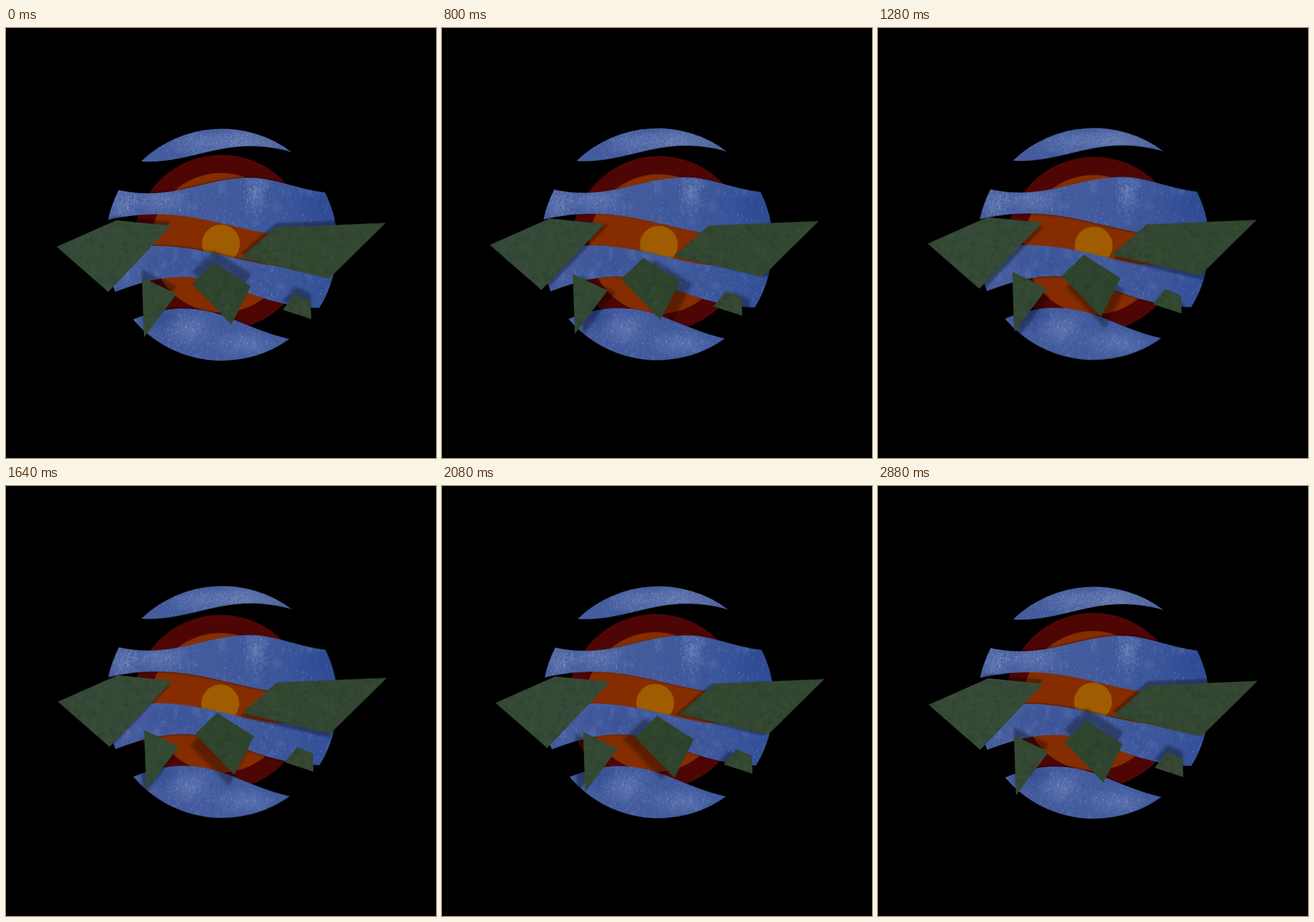
An HTML page with a canvas for the animation above (2920 ms loop, 748x748 px).

```html
<!DOCTYPE html>
<html>
<head>
<meta charset="utf-8">
<style>
html, body { margin: 0; width: 100%; height: 100%; overflow: hidden; background: #000; }
canvas { display: block; }
</style>
</head>
<body>
<canvas id="stage" width="748" height="748"></canvas>
<script>
const SIZE = 748, FRAME = 40, FRAMES = 73;
const ctx = document.getElementById('stage').getContext('2d');

let seed = 7;
const rand = () => (seed = (seed * 16807) % 2147483647) / 2147483647;
const spread = () => rand() + rand() + rand() - 1.5;

// Pre-renders shapes once; the texture only lands on painted pixels.
function layer(shapes, texture) {
  const canvas = document.createElement('canvas');
  canvas.width = canvas.height = SIZE;
  const g = canvas.getContext('2d');
  for (const [path, color] of shapes) {
    g.fillStyle = color;
    g.fill(new Path2D(path));
  }
  g.globalCompositeOperation = 'source-atop';
  if (texture) texture(g);
  return canvas;
}

function blot(g, x, y, rx, ry, rgb, alpha) {
  g.save();
  g.translate(x, y);
  g.scale(rx, ry);
  const fade = g.createRadialGradient(0, 0, 0, 0, 0, 1);
  fade.addColorStop(0, `rgba(${rgb},${alpha})`);
  fade.addColorStop(1, `rgba(${rgb},0)`);
  g.fillStyle = fade;
  g.fillRect(-1, -1, 2, 2);
  g.restore();
}

function paintWater(g) {
  const light = '142,162,212', dark = '38,66,138';
  const shade = g.createLinearGradient(174, 0, 578, 0);
  shade.addColorStop(0, 'rgba(76,96,160,.5)');
  shade.addColorStop(.5, 'rgba(64,88,156,.3)');
  shade.addColorStop(1, 'rgba(42,74,150,.75)');
  g.fillStyle = shade;
  g.fillRect(0, 0, SIZE, SIZE);
  blot(g, 450, 200, 110, 40, '122,134,176', .5);
  blot(g, 550, 310, 60, 70, dark, .4);
  blot(g, 265, 502, 45, 30, dark, .6);
  blot(g, 300, 405, 90, 45, dark, .25);
  const patches = [[322, 525, 50, 32], [435, 288, 24, 40], [205, 305, 32, 32],
    [270, 300, 55, 28], [335, 200, 55, 28], [400, 195, 50, 22], [420, 550, 70, 28]];
  for (const p of patches) blot(g, ...p, light, .32);
  for (let i = 0; i < 150; i++)
    blot(g, 174 + rand() * 404, 175 + rand() * 404, 3 + rand() * 10, 6 + rand() * 16,
      rand() < .45 ? light : dark, .18);
  for (let i = 0; i < 12000; i++) {
    let x = 174 + rand() * 404, y = 175 + rand() * 404;
    if (i % 5 < 2) {
      const p = patches[i % patches.length];
      x = p[0] + spread() * p[2];
      y = p[1] + spread() * p[3];
    }
    g.fillStyle = rand() < .55 ? `rgba(160,180,225,${rand() * .4})` : `rgba(32,58,124,${rand() * .4})`;
    g.fillRect(x, y, .7 + rand() * .6, .8 + rand() * rand() * 5);
  }
}

function paintMoss(g) {
  for (let i = 0; i < 2600; i++)
    blot(g, 80 + rand() * 590, 330 + rand() * 215, 2 + rand() * 6, 2 + rand() * 6,
      rand() < .5 ? '36,55,38' : '64,83,62', .25);
}

const water = [
  'M235 232C240 232.5 245 232.5 250 232.5C310 232.5 362 205.5 425 205.5C452 205.5 477 210 497 216' +
    'A202 202 0 0 0 235 232Z',
  'M196 282C214 286 232 287.5 250 287.5C310 287.5 362 260.5 425 260.5C467 260.5 505 280 555 286' +
    'A202 202 0 0 1 576 364L478 359C415 356 345 324 262 324C230 324 203 328 177.5 334' +
    'A202 202 0 0 1 196 282Z',
  'M174 388C200 382 230 379 262 379C345 379 415 411 478 414C512 414 545 412 573 411' +
    'A202 202 0 0 1 545 487C440 484 385 433 308 433C262 433 225 446 190 459A202 202 0 0 1 174 388Z',
  'M221 507C250 495 280 488 308 488C378 488 418 524 493 541A202 202 0 0 1 221 507Z'
].map(path => [path, '#435c9d']);

const disc = (x, y, r) => `M${x - r} ${y}a${r} ${r} 0 0 1 ${2 * r} 0a${r} ${r} 0 0 1 ${-2 * r} 0Z`;

// Each layer: drift in x and y, shadow distance, shadow blur.
const layers = [
  { art: layer([
      [disc(374.7, 373, 152.5), '#4e0605'],
      [disc(374, 373.7, 121.5), '#852d00'],
      [disc(374, 375, 33), '#a05c00']]),
    dx: -3.2, dy: -1.8, shadow: 0, blur: 0 },
  { art: layer(water, paintWater), dx: 1, dy: .7, shadow: 2, blur: 2 },
  { art: layer([
      ['M88 380.5L192 334.5L287.5 344L178 459Z', '#354a37'],
      ['M660.5 339L469 347L408 400L562 436Z', '#334731']], paintMoss),
    dx: 5, dy: 2.8, shadow: 7.5, blur: 3 },
  { art: layer([
      ['M236.5 434L297 462.5L240 538Z', '#344933'],
      ['M503 463.5L530 475L531 506.5L481 490Z', '#344832']], paintMoss),
    dx: 9.1, dy: 5, shadow: 14, blur: 4 },
  { art: layer([['M362 408L426 449L392 516L324 445Z', '#2e442d']], paintMoss),
    dx: 12.4, dy: 7.1, shadow: 21.5, blur: 5 }
];

function draw(now) {
  const frame = Math.floor(now / FRAME) % FRAMES;
  const angle = frame / (FRAMES - 1) * 2 * Math.PI;
  const sin = Math.sin(angle), cos = Math.cos(angle);
  ctx.shadowColor = 'transparent';
  ctx.fillStyle = '#000';
  ctx.fillRect(0, 0, SIZE, SIZE);
  for (const { art, dx, dy, shadow, blur } of layers) {
    ctx.shadowColor = shadow ? 'rgba(0,0,0,.31)' : 'transparent';
    ctx.shadowBlur = blur;
    ctx.shadowOffsetX = shadow * sin;
    ctx.shadowOffsetY = -shadow * cos;
    ctx.drawImage(art, -dx * sin, dy * (cos - 1));
  }
}

const start = performance.now();
function tick() {
  draw(performance.now() - start);
  requestAnimationFrame(tick);
}
tick();
</script>
</body>
</html>
```
